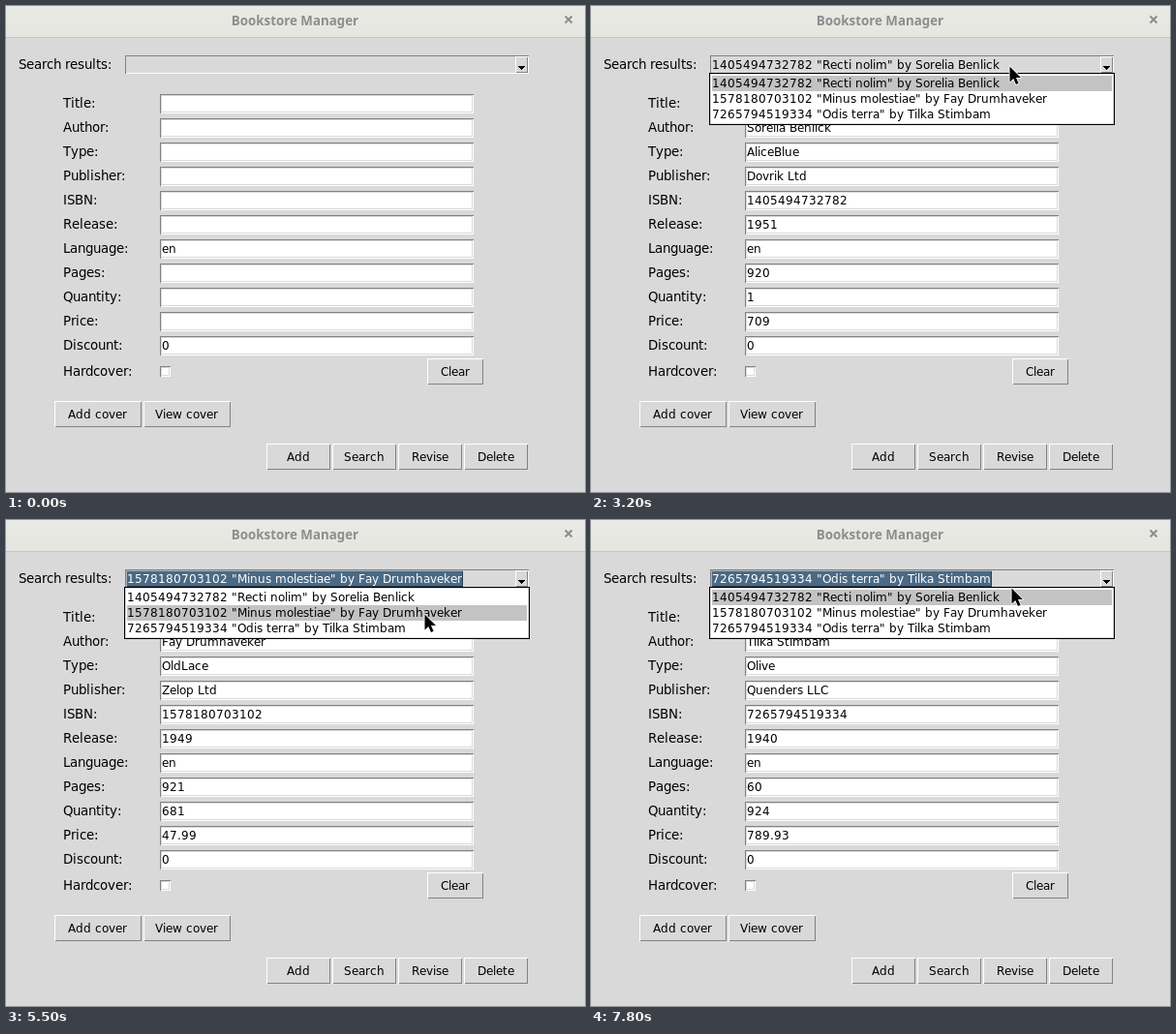
These frames come from a looping animation (598 px wide and 502 px high, 8 s). An HTML page with a canvas:

```html
<!DOCTYPE html>
<html lang="en">
<head>
<meta charset="utf-8">
<title>Bookstore Manager</title>
<style>
  html, body { margin: 0; width: 100%; height: 100%; overflow: hidden; background: #d9d9d9; }
  canvas { display: block; }
</style>
</head>
<body>
<canvas id="stage" width="598" height="502"></canvas>
<script>
const ctx = document.getElementById('stage').getContext('2d');
const LOOP = 8000, STEP = 100;
const GREY = '#d9d9d9', DARK = '#828282';
const SMALL = '12px "DejaVu Sans", sans-serif';
const LARGE = '13.33px "DejaVu Sans", sans-serif';

const labels = 'Title Author Type Publisher ISBN Release Language Pages Quantity Price Discount'.split(' ');
const [emptyForm, ...books] = [
  '||||||en||||0',
  'Recti nolim|Sorelia Benlick|AliceBlue|Dovrik Ltd|1405494732782|1951|en|920|1|709|0',
  'Minus molestiae|Fay Drumhaveker|OldLace|Zelop Ltd|1578180703102|1949|en|921|681|47.99|0',
  'Odis terra|Tilka Stimbam|Olive|Quenders LLC|7265794519334|1940|en|60|924|789.93|0'
].map(row => row.split('|'));
const summary = b => `${b[4]} "${b[0]}" by ${b[1]}`;

// Straight pointer moves: start time, end time, destination.
const ENTER = 500, entry = { x: 345, y: 483 };
const moves = [
  [ENTER, 700, 346, 473],  // onto Search
  [2200, 2300, 347, 466],
  [2300, 2800, 433, 43],   // up, past the combo box
  [2800, 2900, 432, 62],
  [3600, 4200, 421, 91],   // down to the second row
  [4500, 5100, 432, 59],   // back to the combo box
  [5300, 5500, 432, 97],
  [5500, 5900, 428, 109],  // down to the third row
  [6400, 6800, 430, 97],
  [6800, 7200, 440, 60],   // back again
  [7600, 7800, 434, 70]
];

function pointerAt(t) {
  let { x, y } = entry;
  for (const [start, end, toX, toY] of moves) {
    const k = Math.min(1, Math.max(0, (t - start) / (end - start)));
    x += (toX - x) * k;
    y += (toY - y) * k;
  }
  return [Math.round(x), Math.round(y)];
}

function box(x, y, w, h, color) {
  ctx.fillStyle = color;
  ctx.fillRect(x, y, w, h);
}

function bevel(x, y, w, h, fill, topLeft, bottomRight) {
  box(x, y, w, h, topLeft);
  box(x + 1, y + 1, w - 1, h - 1, bottomRight);
  box(x + 1, y + 1, w - 2, h - 2, fill);
}

function field(x, y, w, h) {
  bevel(x, y, w, h, GREY, DARK, '#fff');
  box(x + 2, y + 2, w - 4, h - 4, '#fff');
}

const advance = c => Math.round(ctx.measureText(c).width);

function textWidth(str, font) {
  ctx.font = font;
  return [...str].reduce((sum, c) => sum + advance(c), 0);
}

// Glyphs sit on whole pixels, as in the classic toolkit.
function text(str, x, y, font = SMALL, color = '#000') {
  ctx.font = font;
  ctx.fillStyle = color;
  for (const c of str) {
    ctx.fillText(c, x, y);
    x += advance(c);
  }
}

function button(label, x, y, w, hover, pressed) {
  const edges = pressed ? [DARK, '#fff'] : ['#fff', DARK];
  bevel(x, y, w, 27, hover ? '#ececec' : GREY, ...edges);
  text(label, x + Math.floor((w - textWidth(label, SMALL)) / 2), y + 18);
}

function titleBar() {
  const shade = ctx.createLinearGradient(0, 0, 0, 32);
  shade.addColorStop(0, '#e9e9e5');
  shade.addColorStop(1, '#e6e6e1');
  box(0, 0, 598, 32, shade);
  box(0, 32, 598, 1, '#c6c6c2');
  ctx.font = 'bold 13.33px "Noto Sans", sans-serif';
  ctx.fillStyle = '#8b8e8f';
  ctx.textAlign = 'center';
  ctx.fillText('Bookstore Manager', 298.5, 20);
  ctx.textAlign = 'left';
  ctx.strokeStyle = '#8b8e8f';
  ctx.lineWidth = 2;
  ctx.stroke(new Path2D('M577.5 10.5l7 7m0-7l-7 7'));
}

function comboBox(book, selected) {
  text('Search results:', 13, 65, LARGE);
  bevel(123, 51, 417, 19, GREY, DARK, '#fff');
  if (book) {
    const str = summary(book);
    if (selected) bevel(124, 52, textWidth(str, SMALL) + 2, 17, '#4a6984', '#a4b4c1', '#2c3f4f');
    text(str, 125, 65, SMALL, selected ? '#fff' : '#000');
  }
  bevel(526, 52, 13, 17, GREY, '#fff', DARK);
  for (let i = 0; i < 4; i++) box(529 + i, 62 + i, 7 - 2 * i, 1, '#000');
}

function form(values) {
  labels.forEach((label, i) => {
    const y = 91 + 25 * i;
    text(label + ':', 59, y + 14, LARGE);
    field(159, y, 324, 20);
    text(values[i], 161, y + 14);
  });
  text('Hardcover:', 59, 382, LARGE);
  field(159, 372, 11, 11);
}

function popup(row) {
  box(122, 69, 419, 54, '#000');
  box(123, 70, 417, 52, GREY);
  box(124, 71, 415, 50, '#fff');
  box(125, 72 + 16 * row, 413, 16, '#c3c3c3');
  books.forEach((b, i) => text(summary(b), 125, 84 + 16 * i));
}

const arrowShape = new Path2D('M.5 .5V16.5L4.3 13L7 19L9.6 17.8L7 12H12z');
const beamShape = new Path2D('M-3 -8.5h2.5l.5 1l.5-1h2.5M0 -8v16M-3 8.5h2.5l.5-1l.5 1h2.5');

function cursor(x, y, isBeam) {
  ctx.save();
  ctx.lineJoin = 'round';
  ctx.strokeStyle = '#fff';
  if (isBeam) {
    ctx.translate(x + .5, y);
    ctx.lineWidth = 2;
    ctx.stroke(beamShape);
    ctx.lineWidth = 1;
    ctx.strokeStyle = '#000';
    ctx.stroke(beamShape);
  } else {
    ctx.translate(x, y);
    ctx.lineWidth = 1.6;
    ctx.stroke(arrowShape);
    ctx.fillStyle = '#000';
    ctx.fill(arrowShape);
  }
  ctx.restore();
}

function draw(t) {
  const during = (from, to) => t >= from && t < to;
  const current = [1500, 4500, 6300].filter(chosen => t >= chosen).length - 1;
  const open = during(3200, 4500) || during(5200, 6300) || t >= 7500;
  const [x, y] = pointerAt(t);

  box(0, 0, 598, 502, GREY);
  titleBar();
  comboBox(books[current], current > 0);
  form(books[current] || emptyForm);
  button('Clear', 435, 364, 58);
  button('Add cover', 50, 408, 90);
  button('View cover', 142, 408, 90);
  ['Add', 'Search', 'Revise', 'Delete'].forEach((label, i) => {
    const left = 269 + 68 * i;
    const hover = x >= left && x < left + 66 && y >= 452 && y < 479;
    button(label, left, 452, 66, hover, hover && during(1200, 1500));
  });
  if (open) popup(y < 70 ? current : Math.max(0, Math.floor((y - 72) / 16)));

  const overEntry = !open && x > 159 && x < 483 && y >= 91 && y < 361 && (y - 91) % 25 < 20;
  if (t >= ENTER) cursor(x, y, overEntry);
}

function tick() {
  const t = performance.now() % LOOP;
  draw(t - t % STEP);
  requestAnimationFrame(tick);
}
tick();
</script>
</body>
</html>
```
